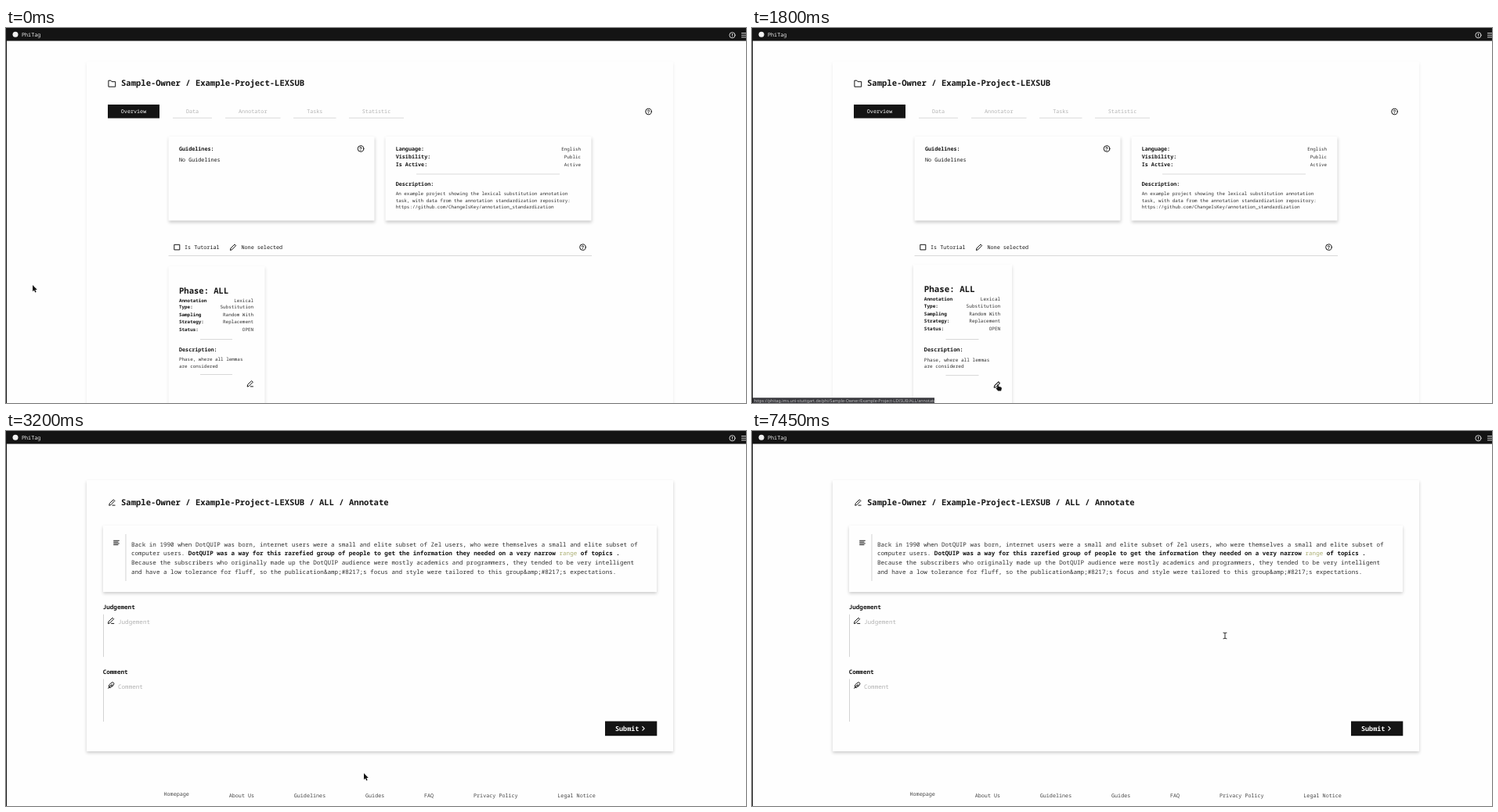
An HTML page with a canvas for the animation above (8 s loop, 945 by 480 pixels).

```html
<!DOCTYPE html>
<html lang="en">
<head>
<meta charset="utf-8">
<title>Annotation walkthrough</title>
<style>
html, body { margin: 0; width: 100%; height: 100%; overflow: hidden; background: #fefefe; }
canvas { display: block; width: 945px; height: 480px; }
</style>
</head>
<body>
<canvas id="stage" width="945" height="480"></canvas>
<script>
const ctx = document.getElementById('stage').getContext('2d');
const LOOP = 8000, STEP = 50;
const INK = '#141414', BODY = '#303030', SOFT = '#b2b2b2', RULE = '#cfcfcf', PAPER = '#fefefe';
const MONO = '"Noto Sans Mono", "DejaVu Sans Mono", monospace';
const EM = 0.4218; // stage pixels per page pixel of type
const USER = 'Sample-Owner';
const PROJECT = USER + ' / Example-Project-LEXSUB';

// Segments between asterisks are bold, those between tildes are the marked word.
const SAMPLES = [
  {
    shift: 5.9, mark: '#bdbdbd',
    lines: [
      'From there, the style of the musical genre would be incorporated into that easy, free singing. *My students perform a wide variety of music and',
      '*they can be found singing leading roles in their high school and college musical productions , singing ~lead~ in rock and wedding bands , winning',
      '*classical music competitions , singing at the summer conservatory of The Lanternby Stagehall , and learning to sing so they can sing with local',
      '*choirs . *Corin Maple Estervaldo, NJ Website: www.corinsinging.example Phone: 000-555-0100 Email: corin@corinsinging.example Expertise/Specialty:',
      'Expert voice building and correction of damaged voices and troubled high range.'
    ]
  },
  {
    shift: 0, mark: '#a9ad70',
    lines: [
      'Back in 1990 when DotQUIP was born, internet users were a small and elite subset of Zel users, who were themselves a small and elite subset of',
      'computer users. *DotQUIP was a way for this rarefied group of people to get the information they needed on a very narrow ~range~ of topics .',
      'Because the subscribers who originally made up the DotQUIP audience were mostly academics and programmers, they tended to be very intelligent',
      'and have a low tolerance for fluff, so the publication&amp;#8217;s focus and style were tailored to this group&amp;#8217;s expectations.'
    ]
  }
];

// Pointer keys: time, x, y.
const PATH = [
  [0, 34, 329], [200, 34, 329], [400, 92, 291], [600, 188, 306], [800, 268, 368],
  [1000, 304, 418], [1200, 311, 446], [1450, 314, 456], [2850, 314, 456],
  [3200, 457, 438], [3350, 560, 360], [3500, 655, 285], [3700, 620, 258],
  [3850, 608.5, 259], [4500, 608.5, 259], [4600, 604, 262], [LOOP, 604, 262]
];

const clamp = (v) => Math.max(0, Math.min(1, v));
const ease = (v) => { v = clamp(v); return v * v * (3 - 2 * v); };

function text(str, x, middle, size, { bold = false, color = INK, align = 'left' } = {}) {
  const px = size * EM;
  ctx.save();
  ctx.translate(x, middle + px * 0.34);
  ctx.scale(0.25, 0.25);
  ctx.font = `${bold ? 600 : 400} ${px * 4}px ${MONO}`;
  ctx.textRendering = 'geometricPrecision';
  ctx.textAlign = align;
  ctx.fillStyle = color;
  ctx.fillText(str, 0, 0);
  const width = ctx.measureText(str).width / 4;
  ctx.restore();
  return width;
}

const heading = (str, x, y, size = 16) => text(str, x, y, size, { bold: true });
const right = (str, x, y) => text(str, x, y, 14, { color: BODY, align: 'right' });

function rect(x, y, w, h, color) {
  ctx.fillStyle = color;
  ctx.fillRect(x, y, w, h);
}

function card(x, y, w, h, alpha = 0.2) {
  ctx.save();
  ctx.shadowColor = `rgba(0,0,0,${alpha})`;
  ctx.shadowBlur = 4;
  ctx.shadowOffsetY = 2;
  rect(x, y, w, h, PAPER);
  ctx.restore();
}

function icon(path, x, y, color = INK, width = 1) {
  ctx.save();
  ctx.translate(x, y);
  ctx.strokeStyle = color;
  ctx.lineWidth = width;
  ctx.lineCap = ctx.lineJoin = 'round';
  ctx.stroke(new Path2D(path));
  ctx.restore();
}

const ring = (r) => `M${r} 0A${r} ${r} 0 1 1 ${-r} 0A${r} ${r} 0 1 1 ${r} 0Z`;
const PENCIL = 'M-3.5 3.5L-3 1.2L2 -3.6L3.6 -2L-1.3 3Z';
const EDIT = PENCIL + 'M0.6 3.7H3.8';
const FEATHER = 'M-3.6 3.8L1.6 -1.4M-2.4 2.5V-.5L.8 -3.4Q2.6 -4.4 3.5 -3.2Q4.4 -1.8 3.2 -.4L.3 2.5ZM-.3 .6H2.4';
const FOLDER = 'M-4.4 3.8V-3.8H-1.4L-.3 -2.3H4.4V3.8Z';

function help(x, y) {
  icon(ring(3.8), x, y);
  icon('M-1.2 -.8Q-1 -2 .1 -1.9Q1.3 -1.7 1.1 -.6Q.9 0 0 .5M0 1.9V2', x, y, INK, 0.9);
}

function topBar() {
  rect(0, 0, 945, 16.5, INK);
  rect(0, 0, 1, 480, INK);
  ctx.fillStyle = '#f0f0f0';
  ctx.beginPath();
  ctx.arc(12, 8.3, 3.5, 0, 7);
  ctx.fill();
  text('PhiTag', 20, 8.6, 16, { color: '#f0f0f0' });
  icon(ring(3.6), 927.5, 9.2, '#e8e8e8', 0.9);
  icon('M0 -1.7V.2M0 1.7V1.8', 927.5, 9.2, '#e8e8e8', 0.9);
  icon('M0 -2.6H8M0 0H8M0 2.6H8', 939.5, 9.2, '#e8e8e8', 0.9);
}

function tabs() {
  rect(130, 98, 66, 17.5, INK);
  text('Overview', 163, 106.7, 16, { color: '#fff', align: 'center' });
  for (const [label, x, w] of [['Data', 213, 50], ['Annotator', 280, 70.5], ['Tasks', 367, 54.5], ['Statistic', 438, 70]]) {
    text(label, x + w / 2, 106.7, 16, { color: SOFT, align: 'center' });
    rect(x, 114.7, w, 0.8, RULE);
  }
  help(820.5, 107);
}

function phaseCard(hover) {
  ctx.save();
  const zoom = 1 + 0.025 * hover;
  ctx.translate(269, 400);
  ctx.scale(zoom, zoom);
  ctx.translate(-269, -400);
  card(207.5, 305, 123, 190, 0.12 + 0.04 * hover);
  heading('Phase: ALL', 221, 336, 25);
  const small = { bold: true };
  [['Annotation', 'Lexical', 348.7], ['Type:', 'Substitution', 357], ['Sampling', 'Random With', 367.2],
    ['Strategy:', 'Replacement', 375.7], ['Status:', 'OPEN', 385.7]].forEach(([name, value, y]) => {
    text(name, 221, y, 14, small);
    right(value, 316, y);
  });
  rect(248, 398.2, 41, 0.8, RULE);
  heading('Description:', 221, 411.3);
  text('Phase, where all lemmas', 221, 424, 14, { color: BODY });
  text('are considered', 221, 432.5, 14, { color: BODY });
  rect(248, 443.2, 41, 0.8, RULE);
  icon(EDIT, 311.7, 455.2);
  ctx.restore();
}

function overview(t) {
  card(103, 43, 749, 460, 0.08);
  icon(FOLDER, 135.3, 71);
  heading(PROJECT, 147, 70.8, 25);
  tabs();

  card(207.5, 139, 263, 107.5);
  heading('Guidelines:', 221, 154.7);
  text('No Guidelines', 221, 168.5, 16);
  help(453, 154.5);

  card(484.5, 139, 263, 107.5);
  [['Language:', 'English'], ['Visibility:', 'Public'], ['Is Active:', 'Active']].forEach(([name, value], i) => {
    heading(name, 497.7, 154.8 + i * 10.1);
    right(value, 734, 154.8 + i * 10.1);
  });
  rect(524, 186.6, 183, 0.8, RULE);
  heading('Description:', 497.7, 199.8);
  ['An example project showing the lexical substitution annotation',
    'task, with data from the annotation standardization repository:',
    'https://github.com/ChangeIsKey/annotation_standardization'
  ].forEach((line, i) => text(line, 497.7, 212.3 + i * 8.5, 14, { color: BODY }));

  icon('M-3.3 -3.3H3.3V3.3H-3.3Z', 218.5, 280.6);
  text('Is Tutorial', 228, 280.7, 16);
  icon(PENCIL, 290, 280.6);
  text('None selected', 300.5, 280.7, 16);
  help(736.5, 280.6);
  rect(207.5, 291, 540.5, 0.8, RULE);
  phaseCard(ease((t - 650) / 250));
}

function footer() {
  [['Homepage', 201.5], ['About Us', 284.7], ['Guidelines', 367.7], ['Guides', 459],
    ['FAQ', 534], ['Privacy Policy', 597], ['Legal Notice', 704.3]]
    .forEach(([label, x], i) => text(label, x, i ? 466.8 : 464.8, 16, { color: '#444' }));
}

function annotateTitle(y) {
  icon(EDIT, 135.3, y);
  heading(PROJECT + ' / ALL / Annotate', 147, y, 25);
}

function loading(t) {
  card(103, 147, 749, 180);
  annotateTitle(175);
  const lead = Math.floor(t / 100) % 8;
  for (let i = 0; i < 8; i++) {
    const a = i * Math.PI / 4, c = Math.cos(a), s = Math.sin(a);
    const shade = 0.25 + 0.4 * ((i - lead + 8) % 8) / 7;
    icon(`M${c * 3} ${s * 3}L${c * 5.6} ${s * 5.6}`, 477.3, 246, `rgba(60,60,60,${shade})`, 1.2);
  }
}

function richLine(line, x, y, mark) {
  let bold = false, marked = false;
  for (const part of line.split(/([*~])/)) {
    if (part === '*') bold = !bold;
    else if (part === '~') marked = !marked;
    else if (part) x += text(part, x, y, 18, { bold: bold && !marked, color: marked ? mark : bold ? INK : BODY });
  }
}

function field(label, glyph, y) {
  heading(label, 123.7, y, 18);
  rect(124, y + 9, 0.9, 54.5, RULE);
  icon(glyph, 134, y + 17);
  text(label, 143, y + 18.7, 18, { color: SOFT });
}

function form({ shift, lines, mark }) {
  const top = -shift, low = shift;
  card(103, 63 + top, 749, 347 + 2 * shift);
  annotateTitle(91.4 + top);
  card(124, 121 + top, 707, 85 + 2 * shift);
  rect(152.5, 132 + top, 0.9, 60 + 2 * shift, RULE);
  icon('M0 -2.7H6.8M0 -.9H5.4M0 .9H6.8M0 2.7H5.4', 137.6, 143 + top, INK, 0.9);
  lines.forEach((line, i) => richLine(line, 160, 145 + top + i * 11.9, mark));
  field('Judgement', EDIT, 225.7 + low);
  field('Comment', FEATHER, 308.5 + low);
  rect(765, 371.5 + low, 66.3, 18.7, INK);
  text('Submit', 778, 380.8 + low, 20, { bold: true, color: '#fff' });
  icon('M-1.2 -2.4L1.2 0L-1.2 2.4', 814, 380.8 + low, '#fff', 1.1);
}

function statusBar(t) {
  const alpha = t < 2400 ? clamp((t - 1600) / 150) : t < 2450 ? 0.5 : t < 2500 ? 0.08 : 0;
  if (!alpha) return;
  ctx.save();
  ctx.globalAlpha = alpha;
  rect(1, 473.3, 232, 6.7, '#38383d');
  ctx.font = '5.3px "Noto Sans", sans-serif';
  ctx.textRendering = 'geometricPrecision';
  ctx.fillStyle = '#c8c8c8';
  ctx.fillText(`https://phitag.ims.uni-stuttgart.de/phi/${USER}/Example-Project-LEXSUB/ALL/annotate`, 2.5, 478.9);
  ctx.restore();
}

function pointerAt(t) {
  const i = PATH.findIndex((key) => key[0] > t);
  const [t0, x0, y0] = PATH[i - 1], [t1, x1, y1] = PATH[i];
  const k = (t - t0) / (t1 - t0);
  return [x0 + (x1 - x0) * k, y0 + (y1 - y0) * k];
}

function pointer(t) {
  const [x, y] = pointerAt(t);
  if (t >= 3500) {
    icon('M-2 -3.8Q-.4 -3.8 0 -3.2Q.4 -3.8 2 -3.8M0 -3.2V3.2M-2 3.8Q-.4 3.8 0 3.2Q.4 3.8 2 3.8', x, y, INK, 0.9);
    return;
  }
  const hand = t >= 1200 && t < 2300;
  const shape = new Path2D(hand
    ? 'M-.8 .6Q0 -.4 .9 .6V3L3.6 3.4Q5 3.8 4.9 5.2L4.1 8.4H.2L-2.6 5.3Q-2.5 4 -.8 4.8Z'
    : 'M0 0V8.3L1.9 6.6L3.2 9.6L4.6 9L3.3 6.1H5.8Z');
  ctx.save();
  ctx.translate(x, y);
  ctx.lineWidth = 1;
  ctx.strokeStyle = '#fff';
  ctx.stroke(shape);
  ctx.fillStyle = '#111';
  ctx.fill(shape);
  ctx.restore();
}

function draw(now) {
  const t = Math.floor((now % LOOP) / STEP) * STEP;
  rect(0, 0, 945, 480, PAPER);
  if (t < 2300) {
    overview(t);
  } else {
    if (t < 2400) loading(t);
    else form(SAMPLES[t < 2550 ? 0 : 1]);
    footer();
  }
  const caretOn = t >= 3850 && Math.floor((t - 3850) / 1200) % 2 === 0;
  if (caretOn) rect(142.7, 239.5, 0.9, 10, INK);
  topBar();
  statusBar(t);
  pointer(t);
}

const start = performance.now();
function tick() {
  draw(performance.now() - start);
  requestAnimationFrame(tick);
}
tick();
</script>
</body>
</html>
```
